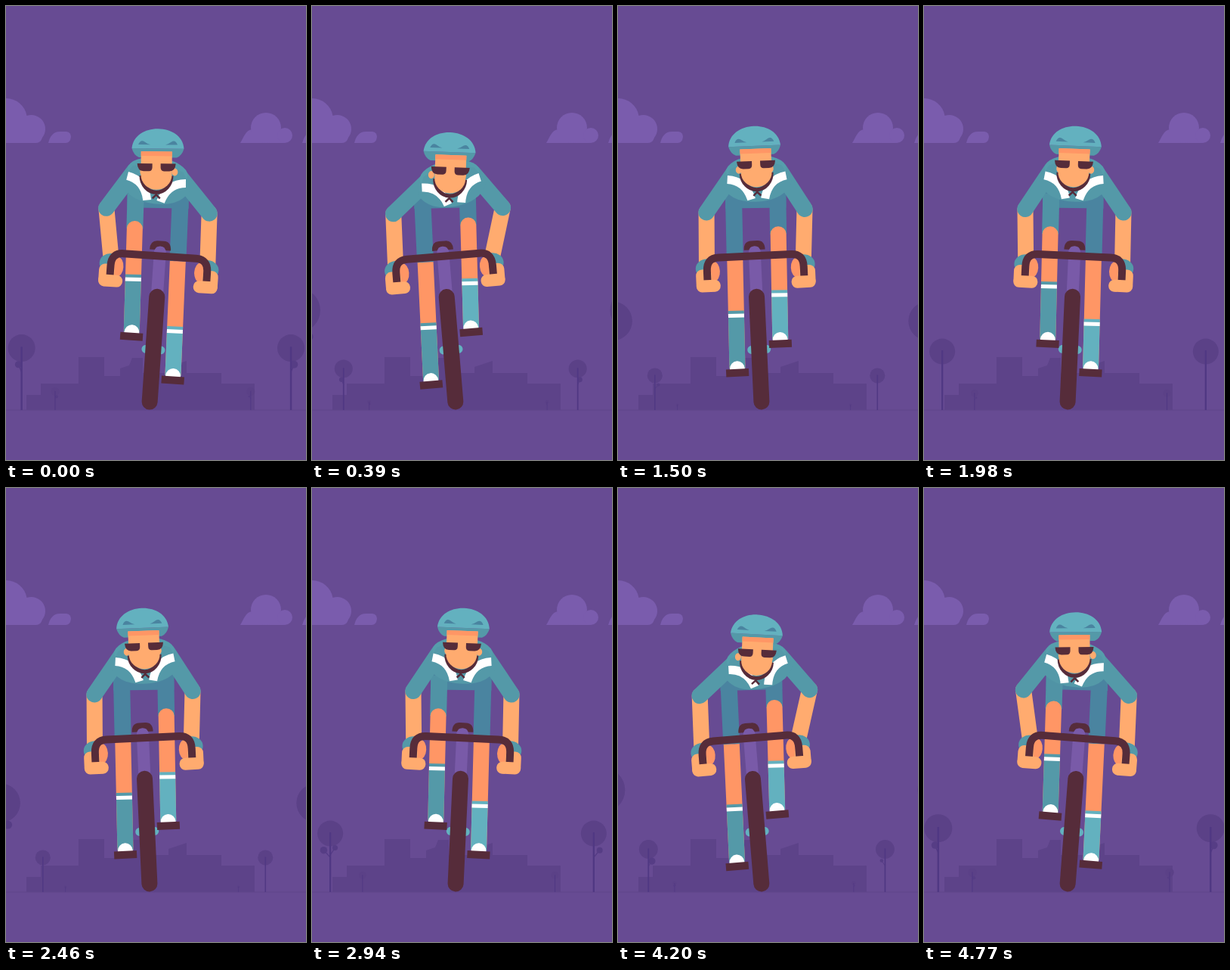
Recreate the animation shown at these times as an HTML page. Size 397 by 600 pixels, loop 4800 ms.

```html
<!DOCTYPE html>
<html lang="en">
<head>
<meta charset="utf-8">
<title>Cyclist</title>
<style>
html, body { margin: 0; width: 100%; height: 100%; overflow: hidden; background: #674b93; }
svg { display: block; width: 100%; height: 100%; }
</style>
</head>
<body>
<svg viewBox="0 0 397 600" xmlns="http://www.w3.org/2000/svg">
  <rect width="397" height="600" fill="#674b93"/>
  <g fill="#7a5cad">
    <path d="M0 122A28 28 0 0 1 27.500 145A18.500 18.500 0 0 1 48 174Q46 181 40 181H0Z"/>
    <path d="M56 181C58 172 63 166 71 166H80Q86 167 86 173Q85 181 79 181Z"/>
    <path d="M310 181C315 173 317 164 326 163H360L369 181Z"/>
    <circle cx="344" cy="161" r="20"/>
    <circle cx="369" cy="171" r="10"/>
    <path d="M392 181Q394 174 397 170V181Z"/>
  </g>
  <path fill="#5d4389" d="M27 534V514H46V499H96V464H130V489H151V479L163 475L167 465H181V485H215V477L239 469V485H285V499H329V534Z"/>
  <path d="M0 534H397" stroke="#5f4489"/>
  <g id="trees"></g>
  <g id="rider"></g>
</svg>
<script>
const LOOP = 4800, BEAT = 960;
const DARK = '#562c3a', TEAL = '#5499a8', LIGHT = '#63b1bf', DEEP = '#4a84a0',
      SKIN = '#ffab6f', SHADE = '#ff9665', WHITE = '#fff';
const treesEl = document.getElementById('trees');
const riderEl = document.getElementById('rider');

const f = v => v.toFixed(2);
const path = (d, fill) => `<path d="${d}" fill="${fill}"/>`;
const line = (d, color, w, cap = 'butt') =>
  `<path d="${d}" fill="none" stroke="${color}" stroke-width="${w}" stroke-linecap="${cap}" stroke-linejoin="round"/>`;
const rect = (x, y, w, h, fill, r = 0) =>
  `<rect x="${f(x)}" y="${f(y)}" width="${f(w)}" height="${f(h)}" rx="${r}" fill="${fill}"/>`;
const oval = (x, y, rx, ry, fill) =>
  `<ellipse cx="${f(x)}" cy="${f(y)}" rx="${f(rx)}" ry="${f(ry)}" fill="${fill}"/>`;
const group = (x, y, deg, body) =>
  `<g transform="translate(${f(x)} ${f(y)}) rotate(${f(deg)})">${body}</g>`;
const both = body => body + `<g transform="scale(-1 1)">${body}</g>`;
const mix = (a, b, k) => a + (b - a) * Math.min(1, Math.max(0, k));

// Leaves per tree: offset, height and radius relative to the trunk
const LEAVES = {
  left: [[[.1, .72, .045]], [], [[-.11, .7, .06], [.08, .74, .045]], [[.08, .71, .08]], [[-.05, .72, .055]]],
  right: [[], [], [[.1, .7, .05]], [[-.08, .72, .04]], [[.05, .72, .06]]]
};

function tree(x, h, leaves) {
  const at = k => 534 - k * h;
  let s = oval(x, at(.98), .215 * h, .215 * h, '#5b4187');
  for (const [dx, y, r] of leaves) {
    s += line(`M${f(x)} ${f(at(y - .12))}L${f(x + dx * h)} ${f(at(y))}`, '#523a83', f(.015 * h));
    s += oval(x + dx * h, at(y), r * h, r * h, '#563d85');
  }
  return s + line(`M${f(x)} 534V${f(at(1))}`, '#503883', f(.4 + .024 * h));
}

function trees(t) {
  const last = Math.floor(t / BEAT);
  let s = '';
  for (let n = last - 3; n <= last; n++) {
    const age = t - n * BEAT;
    const size = Math.pow(.00375 * Math.max(0, 3084 - age), 2);
    if (size < 2) continue;
    const k = ((n % 5) + 5) % 5, h = 1.32 * size;
    s += tree(84 - size, h, LEAVES.left[k]) + tree(301 + 1.2 * size, h, LEAVES.right[k]);
  }
  return s;
}

const wave = t => 2 * Math.PI * t / BEAT;
const lean = t => Math.cos(wave(t - 870));

// Right elbow; the left one mirrors it half a beat later
function elbow(t) {
  const p = wave(t);
  return [258.7 + 10.5 * Math.cos(p) - 3.1 * Math.sin(p) - 4.5 * Math.sin(2 * p), 270.5 + 4.1 * lean(t)];
}

const hipX = (side, tilt) =>
  (side < 0 ? 161.5 : 218) + (side * tilt > 0 ? 15.3 : 12) * tilt;

function leg(side, tilt, deg) {
  const down = side * tilt, a = deg * Math.PI / 180;
  const lx = side < 0 ? -30 : 28.5, ly = -59.5 + 32.5 * down;
  const x = 190 + lx * Math.cos(a) - ly * Math.sin(a);
  const y = 525 + lx * Math.sin(a) + ly * Math.cos(a);
  const hip = hipX(side, tilt);
  let knee = mix(291, 335, (down + .556) / 1.112);
  if (down > .556) knee += 8 * (down - .556);
  if (down < -.556) knee += 26 * (down + .556);
  const k = y - knee, r = mix(10, 0, .5 + down);
  const sock = side < 0 ? 76 : 65, color = side < 0 ? TEAL : LIGHT;
  const shorts = side > 0 || down > 0 ? DEEP : '#5093a5';
  const turn = Math.atan2(hip - x, y - 258) * 180 / Math.PI;
  const top = y - 248;
  return group(x, y, turn,
    rect(-11, -top, 22, top - k + r, shorts) +
    path(`M-10.500 -6V${f(r - k)}A10.500 ${f(Math.max(r, .01))} 0 0 1 10.500 ${f(r - k)}V-6Z`, SHADE) +
    rect(-10.5, -sock - 6, 21, sock, color) +
    rect(-10.5, -sock - 2, 21, 5, WHITE)) +
    group(x, y, deg, path('M-10 -3V-5A10 10.500 0 0 1 10 -5V-3Z', WHITE) + rect(-15, -5, 30, 10, DARK));
}

function head(tilt) {
  const face =
    line('M-20 36A20 22 0 0 0 20 36', DARK, 5) +
    path('M-20.500 4H20.500V35A20.500 19.500 0 0 1 -20.500 35Z', SKIN) +
    rect(-20.5, 4, 41, 6, SHADE) +
    both(path('M5.500 20H25.500Q25 30 17 30H10Q5.500 30 5.500 25Z', DARK)) +
    line('M-5 66L0 61L5 66', DARK, 2.5);
  return path('M-34.500 0H34.500Q32 9 25 12H-25Q-32 9 -34.500 0Z', TEAL) +
    group(2 * tilt, 0, 0, both(oval(21, 31, 4, 5, SKIN))) +
    group(-2 * tilt, 0, 0, face) +
    path('M-34.500 0C-33 -17 -17 -26 0 -26S33 -17 34.500 0Z', LIGHT) +
    both(path('M10 -5Q14 -6 18 -9Q23 -12 26 -5Z', DEEP));
}

function rider(t) {
  const p = wave(t), cos = Math.cos(p), sin = Math.sin(p), bob = Math.sin(2 * p);
  const tilt = lean(t), deg = 4.8 * tilt, a = deg * Math.PI / 180;
  const bike = body => group(190, 525, deg, body);
  const tx = 191 + 8.3 * cos - .5 * sin, ty = 229.5 - 4 * bob;
  const turn = 7.5 * cos - 7 * sin, b = turn * Math.PI / 180;

  const er = elbow(t), em = elbow(t + BEAT / 2), el = [381 - em[0], em[1]];
  let fore = '', upper = '';
  for (const [side, e] of [[-1, el], [1, er]]) {
    const wx = 190 + 64 * side * Math.cos(a) + 187 * Math.sin(a);
    const wy = 525 + 64 * side * Math.sin(a) - 187 * Math.cos(a);
    const sx = tx + 31 * side * Math.cos(b) + 7 * Math.sin(b);
    const sy = ty + 31 * side * Math.sin(b) - 7 * Math.cos(b);
    const from = `M${f(e[0])} ${f(e[1])}L`;
    fore += line(`${from}${f(wx)} ${f(wy)}`, SKIN, 21, 'round');
    upper += line(`${from}${f(sx)} ${f(sy)}`, TEAL, 21.5, 'round');
  }

  const hl = hipX(-1, tilt) - 11, hr = hipX(1, tilt) + 11;
  const pelvis = path(`M${f(hl)} 240H${f(hr)}V${f(267 + tilt)}L${f(hl)} ${f(267 - tilt)}Z`, DEEP);
  const torso =
    oval(0, -10, 40, 19, '#569eac') +
    path('M-34 -14Q0 -26 34 -14L46 8Q36 32 0 32Q-36 32 -46 8Z', TEAL) +
    both(line('M39 0Q15 3 9 28.500', WHITE, 11));
  const grip = both(oval(64, -181, 15, 13, TEAL) + oval(55, -177, 8, 13, SHADE) +
    rect(58, -180, 21, 29, SKIN, 8));
  const bar = line('M-64 -164V-178Q-64 -195 -48 -195H48Q64 -195 64 -178V-164', DARK, 10, 'round');
  const fingers = both(rect(47, -166, 32, 16, SKIN, 7.5));

  return bike(rect(-15.5, -76.5, 31, 11, LIGHT, 5.5)) +
    pelvis + leg(-1, tilt, deg) + leg(1, tilt, deg) +
    bike(line('M-10 -203Q-10 -211 -4 -211H4Q10 -211 10 -203', DARK, 8) +
      rect(-8, -208, 16, 72, '#795aa8', 8) +
      line('M0 -141V-2', DARK, 21, 'round')) +
    fore + upper +
    group(tx, ty, turn, torso) +
    group(190.5 + 10.5 * cos + .6 * sin, 188.4 - 5 * bob, 4.8 * sin + .5 * cos, head(tilt)) +
    bike(grip + bar + fingers);
}

function draw(now) {
  const t = now % LOOP;
  treesEl.innerHTML = trees(t);
  riderEl.innerHTML = rider(t);
}

const start = performance.now();
function tick() {
  draw(performance.now() - start);
  requestAnimationFrame(tick);
}
tick();
</script>
</body>
</html>
```
